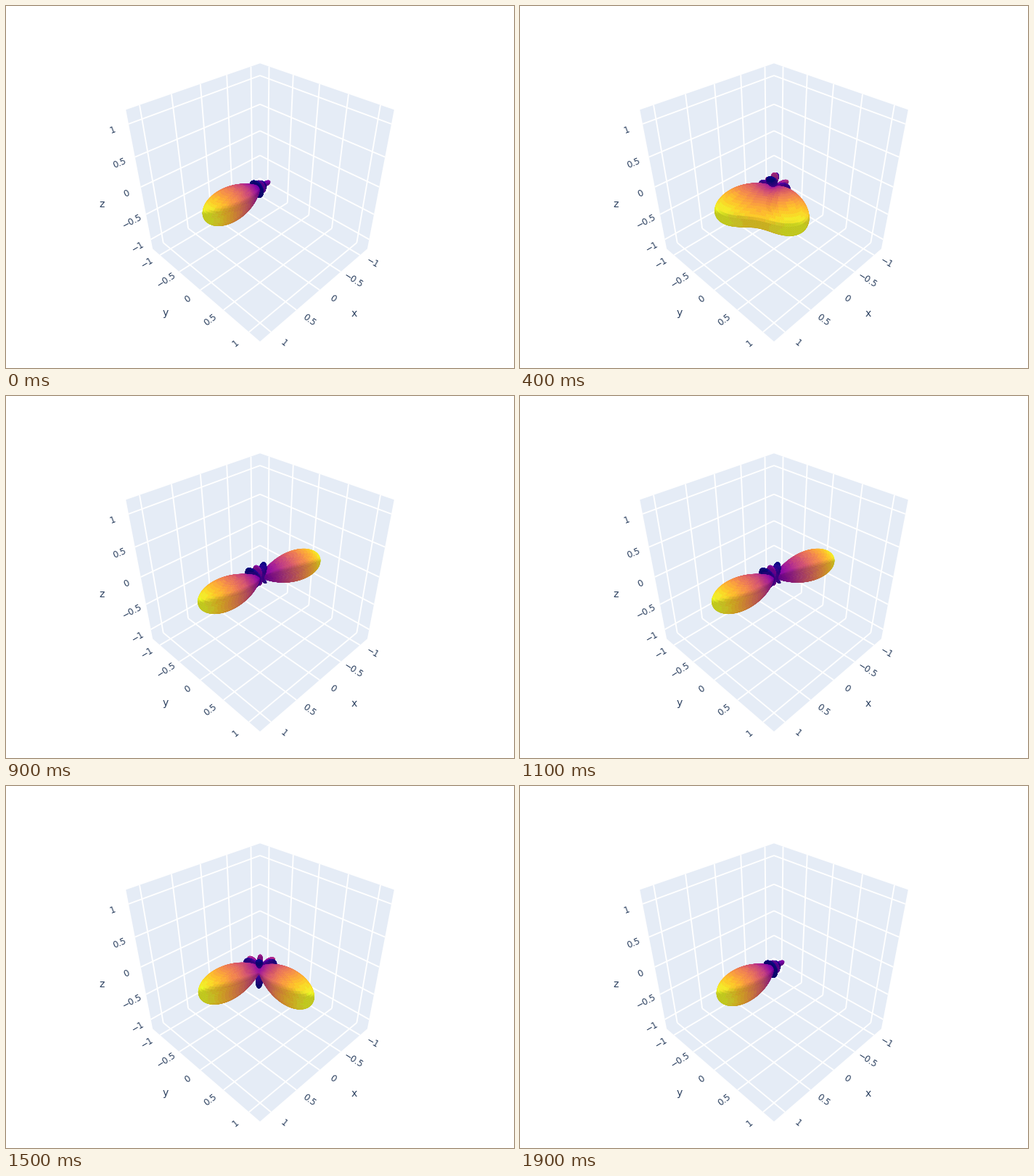
A matplotlib script for the animation above (2 s loop, 700 by 500 pixels).

```python
import numpy as np
import matplotlib.pyplot as plt
from matplotlib.animation import FuncAnimation
from matplotlib.collections import LineCollection, PolyCollection
from numpy.polynomial.legendre import legval

W, H, DPI = 700, 500, 100
LIM = 1.2                       # every axis runs from -LIM to LIM
STEPS = 18                      # beam positions in one sweep
FOCAL = H / 2 / np.tan(np.pi / 8)
EYE_DIST = 1.5 * np.sqrt(3)
RIGHT = np.array([-1, 1, 0]) / np.sqrt(2)
UP = np.array([-1, -1, 2]) / np.sqrt(6)
TOWARD = np.array([1, 1, 1]) / np.sqrt(3)

WALL, INK = "#E5ECF6", "#2A3F5F"
TICKS = [-1, -0.5, 0, 0.5, 1]
LEVELS = 28
PLASMA = plt.get_cmap("plasma", LEVELS)


def project(points):
    """Data coordinates to stage pixels."""
    p = np.asarray(points, float) / (2 * LIM)
    scale = FOCAL / (EYE_DIST - p @ TOWARD)
    return np.stack([W / 2 + scale * (p @ RIGHT),
                     H / 2 - scale * (p @ UP)], axis=-1)


def px(size):
    return size * 72 / DPI


fig = plt.figure(figsize=(W / DPI, H / DPI), dpi=DPI, facecolor="white")
ax = fig.add_axes([0, 0, 1, 1])
ax.set_xlim(0, W)
ax.set_ylim(H, 0)
ax.axis("off")


def draw_box():
    a = LIM
    outline = [(-a, -a, a), (-a, a, a), (-a, a, -a),
               (a, a, -a), (a, -a, -a), (a, -a, a)]
    ax.add_collection(PolyCollection([project(outline)], facecolors=WALL,
                                     edgecolors="none", zorder=1))
    lines = []
    for t in TICKS:
        lines += [
            [(t, -a, -a), (t, -a, a)], [(t, -a, -a), (t, a, -a)],
            [(-a, t, -a), (-a, t, a)], [(-a, t, -a), (a, t, -a)],
            [(-a, -a, t), (a, -a, t)], [(-a, -a, t), (-a, a, t)],
        ]
    ax.add_collection(LineCollection(project(lines), colors="white",
                                     linewidths=px(1.9), zorder=2))


def tick_label(value, edge, spot):
    """Write a value at spot, turned along its grid line."""
    (x0, y0), (x, y) = project([edge, spot])
    angle = np.degrees(np.arctan((y0 - y) / (x - x0)))
    ax.text(x, y, f"{value:g}".replace("-", "\u2212"), rotation=angle,
            ha="center", va="center", color=INK, fontsize=px(12),
            family="DejaVu Sans", zorder=3)


def draw_labels():
    a, out = LIM, 1.43
    for t in TICKS:
        tick_label(t, (t, a, -a), (t, out, -a))
        tick_label(t, (a, t, -a), (out, t, -a))
        tick_label(t, (a, -a, t), (out, -a, t))
    for name, x, y in [("x", 480, 425), ("y", 219.5, 424), ("z", 132.5, 274.5)]:
        ax.text(x, y, name, ha="center", va="center", color=INK,
                fontsize=px(14), family="DejaVu Sans", zorder=3)


draw_box()
draw_labels()

# Unit directions over the sphere
theta, phi = np.meshgrid(np.linspace(0, np.pi, 106),
                         np.linspace(0, 2 * np.pi, 211), indexing="ij")
DIRS = np.stack([np.sin(theta) * np.cos(phi),
                 np.sin(theta) * np.sin(phi),
                 np.cos(theta)], axis=-1)


def beam(cosine):
    """Fourth-order beam with the highest directivity."""
    return legval(cosine, [1, 3, 5, 7, 9]) / 25


def pattern(angle):
    """Unit gain at azimuth 0 and at the given azimuth."""
    c, s = np.cos(angle), np.sin(angle)
    total = beam(DIRS[..., 0]) + beam(DIRS @ np.array([c, s, 0]))
    return total / (1 + beam(c))


def quads(grid):
    return np.stack([grid[:-1, :-1], grid[1:, :-1],
                     grid[1:, 1:], grid[:-1, 1:]], axis=2)


def surface(angle):
    """Visible faces from back to front, with their lit colours."""
    gain = pattern(angle)
    corners = quads(np.abs(gain)[..., None] * DIRS).reshape(-1, 4, 3)
    value = quads(gain).mean(axis=2).ravel()
    center = corners.mean(axis=1)

    normal = np.cross(corners[:, 2] - corners[:, 0],
                      corners[:, 3] - corners[:, 1])
    normal /= np.linalg.norm(normal, axis=1, keepdims=True) + 1e-12
    inward = np.sum(normal * center, axis=1) < 0
    normal[inward] *= -1

    view = EYE_DIST * 2 * LIM * TOWARD - center
    distance = np.linalg.norm(view, axis=1)
    front = np.sum(normal * view, axis=1) > -0.05 * distance
    order = np.argsort(-distance)
    order = order[front[order]]

    level = (value - gain.min()) / (gain.max() - gain.min())
    light = np.minimum(0.8 + 0.8 * np.maximum(normal @ UP, 0), 1)
    colors = PLASMA(level)
    colors[:, :3] *= light[:, None]
    return project(corners[order]), colors[order]


body = PolyCollection([], edgecolors="face", linewidths=px(0.5), zorder=4)
ax.add_collection(body)


def draw(i):
    step = max(i - 1, 0)
    verts, colors = surface(np.radians(20 * min(step, STEPS - step)))
    body.set_verts(verts)
    body.set_facecolor(colors)
    return [body]


anim = FuncAnimation(fig, draw, frames=STEPS + 2, interval=100, repeat=True)
plt.show()
```
